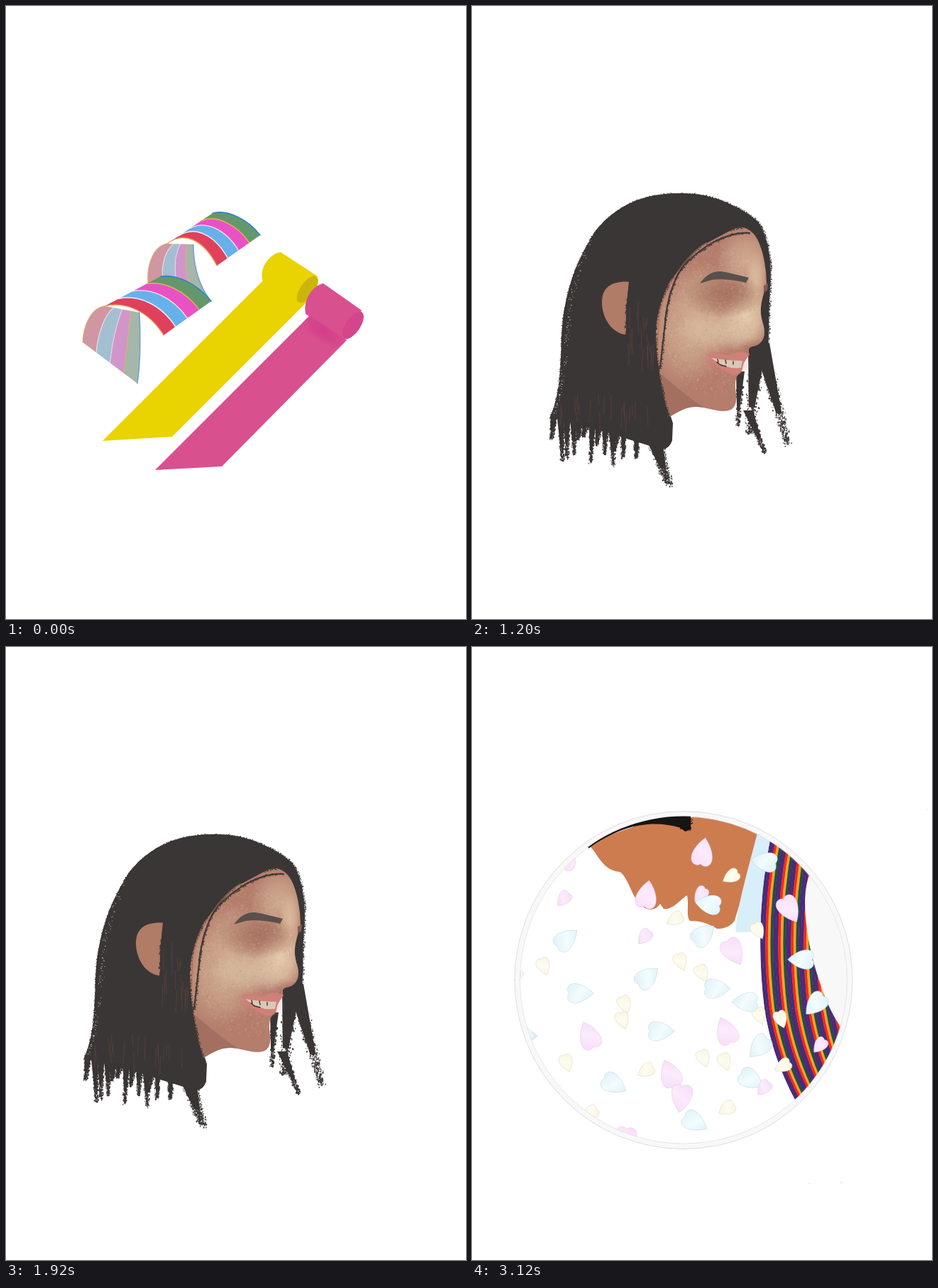
Write an HTML page with a canvas that moves like this. It is 648 px wide and 864 px high and loops after 3600 ms.

```html
<!DOCTYPE html>
<html lang="en">
<head>
<meta charset="utf-8">
<title>Streamers, portrait, confetti</title>
<style>
html, body { margin: 0; width: 100%; height: 100%; overflow: hidden; background: #fff; }
canvas { position: absolute; left: 0; top: 0; width: 648px; height: 864px; opacity: 0; }
</style>
</head>
<body>
<script>
const W = 648, H = 864, HOLD = 1200;
let g; // context of the scene being drawn
let seed = 7;
const rnd = () => (seed = (seed * 16807) % 2147483647) / 2147483647;
const spread = w => (rnd() + rnd() - 1) * w;
const mix = (a, b, t) => a.map((v, i) => v + (b[i] - v) * t);

function fill(d, color) {
  g.fillStyle = color;
  g.fill(new Path2D(d));
}

function line(d, color, width = 1) {
  g.strokeStyle = color;
  g.lineWidth = width;
  g.lineCap = g.lineJoin = 'round';
  g.stroke(new Path2D(d));
}

function clipped(d, draw) {
  g.save();
  g.clip(new Path2D(d));
  draw();
  g.restore();
}

function glow(x, y, rx, ry, rgb, alpha, turn = 0) {
  const s = g.createRadialGradient(0, 0, 0, 0, 0, 1);
  s.addColorStop(0, `rgba(${rgb},${alpha})`);
  s.addColorStop(.5, `rgba(${rgb},${alpha * .65})`);
  s.addColorStop(1, `rgba(${rgb},0)`);
  g.save();
  g.translate(x, y);
  g.rotate(turn);
  g.scale(rx, ry);
  g.fillStyle = s;
  g.fillRect(-1, -1, 2, 2);
  g.restore();
}

/* ---- party streamers ---- */

const BRIGHT = ['#e0405c', '#67b1ea', '#ea51c5', '#63986c'];
const FADED = ['#cf97a2', '#a4bed2', '#d196c9', '#a5b6aa'];
const SEAMS = ['#e6a35c', '#f3eef6', '#f6dff0', '#e3b04f', '#2d7fd2'];

// Stripes blended between a front and a back Bézier edge.
function sheet(front, back, colors, alpha = 1) {
  const edges = SEAMS.map((_, i) => mix(front, back, i / 4));
  const forth = e => `${e.slice(0, 2)}C${e.slice(2)}`;
  const home = e => `${e.slice(6)}C${[e[4], e[5], e[2], e[3], e[0], e[1]]}`;
  colors.forEach((c, i) => fill(`M${forth(edges[i])}L${home(edges[i + 1])}Z`, c));
  g.globalAlpha = alpha;
  edges.forEach((e, i) => line('M' + forth(e), SEAMS[i], 1.4));
  g.globalAlpha = 1;
}

function roll(strip, body, x, y, color, inside) {
  fill(strip, color);
  fill(body, color);
  for (const [c, grow] of [[color, 0], [inside, -.7]]) {
    g.beginPath();
    g.ellipse(x, y, 10.5 + grow, 22.5 + grow, .6, 0, 7);
    g.fillStyle = c;
    g.fill();
  }
}

function streamers() {
  sheet([227, 335, 208, 338, 198, 364, 200, 390], [264, 336, 264, 370, 274, 398, 289, 416], FADED, .6);
  sheet([227, 335, 252, 316, 279, 331, 297, 366], [291, 292, 310, 286, 341, 300, 358, 323], BRIGHT);
  sheet([139, 423, 120, 425, 109, 450, 108, 474], [188, 432, 190, 475, 189, 508, 185, 532], FADED, .6);
  sheet([139, 423, 168, 416, 201, 430, 222, 464], [218, 381, 240, 378, 268, 390, 289, 416], BRIGHT);

  roll('M136 613L362 387L425 416L234 607Z',
    'M387 347L439 381L411 418L362 388C355 371 372 348 387 347Z', 424.5, 399.5, '#e9d300', '#cbb50a');
  const pink = 'M210 654L428 436L480 471L304 649Z';
  roll(pink, 'M447 391L501 429L476 470L422 434C418 414 432 394 447 391Z', 488.5, 450, '#d9508f', '#d4458c');
  clipped(pink, () => glow(447, 458, 42, 17, '211,58,136', .8, .6));
}

/* ---- portrait ---- */

const HAIR = '#3b3636';
const CROWN = 'M110 580C123 550 125 515 126 470C128 410 145 361 174 317C204 280 242 264 292 264'
  + 'C333 263 374 279 403 304C419 327 424 368 419 410L417 500';
const FACE = 'M376 310C400 308 411 345 414 375L415 393C410 408 406 420 407 434C408 445 412 450 412 460'
  + 'C412 471 405 479 394 480C387 483 391 487 390 492L380 500C383 507 380 512 376 518'
  + 'C370 525 371 532 371 539C373 554 374 566 362 570C346 574 330 564 314 565'
  + 'C298 565 286 575 270 584L180 582L250 420L320 340Z';
const PARTING = 'M381 312C351 313 317 338 294 364C280 382 259 421 259 463C260 507 269 551 278 579';

// Loose specks along a path.
function grit(d, count, width, color, size = 1) {
  const p = document.createElementNS('http://www.w3.org/2000/svg', 'path');
  p.setAttribute('d', d);
  const len = p.getTotalLength();
  g.fillStyle = color;
  for (let i = 0; i < count; i++) {
    const q = p.getPointAtLength(rnd() * len), s = .5 + rnd() * size;
    g.fillRect(q.x + spread(width), q.y + spread(width), s, s);
  }
}

// A dry brush stroke which narrows and breaks up toward its end.
function strand(x0, y0, x1, y1, w) {
  const [mx, my] = mix([x0, y0], [x1, y1], .7);
  fill(`M${x0 - w} ${y0}L${mx - w * .35} ${my}L${mx + w * .3} ${my}L${x0 + w} ${y0}Z`, HAIR);
  for (let i = 0; i < w * 45; i++) {
    const t = .25 + rnd() * .75, [x, y] = mix([x0, y0], [x1, y1], t);
    const s = .5 + rnd() * 1.2;
    g.fillRect(x + spread(w * (1.15 - t * .6)), y + spread(4), s, s * 1.5);
  }
}

function mouth() {
  glow(358, 502, 36, 20, '205,125,115', .7, .15);
  fill('M330 491C342 488 354 494 366 491C375 485 384 487 391 491C386 499 382 502 381 511'
    + 'C379 521 370 522 361 517C348 512 338 502 330 491Z', '#cf8078');
  fill('M337 496Q360 500 381 500L379 510Q357 513 337 496Z', '#d8c9b9');
  line('M345 502L350 506L358 508M346 498L347 502M357 499L358 504M368 501L368 505', '#4b302c', 1.4);
}

function face() {
  fill(FACE, '#b47d6c');
  clipped(FACE, () => {
    glow(312, 448, 62, 92, '214,183,153', .85, .25);
    glow(385, 359, 42, 48, '216,184,156', .75);
    glow(386, 439, 38, 50, '230,207,175', 1, .25);
    glow(400, 389, 16, 44, '225,197,165', .8);
    glow(350, 458, 65, 30, '220,194,164', .75);
    glow(355, 408, 58, 31, '160,107,91', .75);
    glow(396, 483, 24, 13, '172,108,94', .7);
    for (let i = 0; i < 1500; i++) {
      const a = rnd() * 6.3, r = Math.sqrt(rnd());
      g.fillStyle = rnd() < .55 ? 'rgba(236,214,185,.1)' : 'rgba(153,103,82,.06)';
      g.fillRect(340 + Math.cos(a) * r * 74, 440 + Math.sin(a) * r * 108, 2.5, 2.5);
    }
    fill('M255 510C280 530 303 551 326 565L270 590Z', '#a36f60');
  });
  line('M333 408C342 399 356 402 365 409M337 415Q352 419 366 411', 'rgba(145,94,80,.25)');
  fill('M321 391C330 379 338 374 350 374C364 376 377 380 390 383L386 390C370 386 350 384 338 386Z', '#58504c');
  fill('M411 394L417 391L416 401L411 403Z', '#805b50');
  mouth();
}

function portrait() {
  fill(CROWN + 'L398 490L300 470L265 530L283 588L282 612Q277 627 264 624L180 598Z', HAIR);
  grit(CROWN, 1100, 1.7, HAIR);
  grit('M112 580C130 545 131 480 137 430C145 385 154 350 170 328', 130, 5, '#f4f1f0', .5);

  for (let x = 112; x < 250; x += 9) strand(x + 4, 575 + (x - 112) * .15, x - 2 + rnd() * 8, 602 + rnd() * 45, 5.5);
  strand(254, 602, 276, 673, 13);
  strand(407, 475, 444, 617, 12);
  strand(402, 480, 391, 602, 13);
  strand(389, 570, 412, 628, 7);
  strand(378, 515, 374, 590, 6);

  face();

  fill(PARTING + 'L282 612Q277 627 264 624L180 598L168 460L175 350C210 275 330 255 403 308'
    + 'Q404 326 408 340Q398 315 381 312Z', HAIR);
  fill('M228 389C200 386 183 394 183 417C183 440 197 461 216 463Z', '#b07b67');
  fill('M221 386L239 382L249 470L222 468C212 452 220 410 221 386Z', HAIR);
  grit('M222 393C217 421 216 440 217 462', 160, 2.5, HAIR);
  grit(PARTING, 500, 2, HAIR);
  const wisp = 'M391 320C357 317 322 341 297 367C283 386 274 419 272 447L265 510';
  line(wisp, '#493b36', 2.2);
  grit(wisp, 400, 2.5, HAIR);
  line('M330 334C300 352 274 394 264 430L261 482', 'rgba(166,111,91,.6)', 1.8);
  for (let i = 0; i < 40; i++) {
    const low = i % 2, x = low ? 120 + rnd() * 145 : 220 + rnd() * 38, y = low ? 545 + rnd() * 35 : 395 + rnd() * 90;
    line(`M${x} ${y}l${spread(3)} ${10 + rnd() * 24}`, 'rgba(128,86,70,.26)', 1.3);
  }
}

/* ---- confetti plate ---- */

// One confetti motif as x, y, direction of the tip; it repeats on a slanted lattice.
const MOTIF = [
  { size: 41, light: '#fcebfd', dark: '#f8def8', rim: '#dcc5df',
    at: [[165, 548, -112], [132, 296, -80], [254, 376, 60], [102, 642, 98]] },
  { size: 25, light: '#fcebfd', dark: '#f8def8', rim: '#dcc5df',
    at: [[129, 355, 130], [297, 568, 130]] },
  { size: 26, light: '#fdfcf1', dark: '#f8f7e2', rim: '#d9d8bd',
    at: [[101, 450, 70], [212, 526, 72], [245, 597, 150], [210, 406, 62], [172, 330, 150], [242, 531, 70]] },
  { size: 38, light: '#f3fcfe', dark: '#e0f3f7', rim: '#bcd3d9',
    at: [[133, 412, -40], [152, 488, 0], [200, 616, 30], [271, 447, 180], [291, 510, 133], [219, 309, 190]] }
];
const HEART = 'M.5 0C.46 .06 .12 .36 -.2 .36C-.46 .36 -.52 .12 -.4 0'
  + 'C-.52 -.12 -.46 -.36 -.2 -.36C.12 -.36 .46 -.06 .5 0Z';

function heart(x, y, deg, { size, light, dark, rim }) {
  g.save();
  g.translate(x, y);
  g.rotate(deg * Math.PI / 180);
  g.scale(size, size);
  const s = g.createLinearGradient(-.4, -.3, .4, .2);
  s.addColorStop(0, dark);
  s.addColorStop(.55, light);
  s.addColorStop(1, dark);
  fill(HEART, s);
  line(HEART, rim, .5 / size);
  g.restore();
}

function confetti() {
  for (const col of [0, 1]) for (const row of [0, 1]) {
    for (const kind of MOTIF) for (const [x, y, deg] of kind.at) {
      const cut = !col && x - .4 * y > 20; // the left column ends along a diagonal
      if (!cut) heart(x + 193 * col - 79 * row, y - 6.5 * col + 60 * row, deg, kind);
    }
  }
}

const disc = r => `M${298 - r} 469.5a${r} ${r} 0 1 1 ${2 * r} 0a${r} ${r} 0 1 1 ${-2 * r} 0Z`;
const SASH = 'M420 272C405 350 402 430 412 510C420 560 435 600 455 638L540 640L520 536'
  + 'C504 515 491 480 480 440C470 400 464 350 475 322L470 270Z';

function stripes() {
  const colors = ['#4b2a78', '#4b2a78', '#f32a1b', '#f7a22f', '#1f5340'], step = 3.6;
  for (let i = 0; i < 35; i++) {
    const x = (i + .5) * step;
    line(`M${420 + x} 272c-15 78 -18 158 -8 238c8 50 23 90 43 128`, colors[i % 5], step + .4);
  }
}

function plate() {
  fill(disc(238), '#f8f8f8');
  line(disc(238), '#d2d2d2', .7);
  clipped(disc(230.5), () => {
    fill(disc(230.5), '#fff');
    fill('M460 300H540V560H515C504 515 491 480 480 440C470 400 464 350 475 322Z', '#f8f8f8');
    fill('M160 276C177 286 180 314 208 317C219 323 224 348 234 359C243 372 257 374 265 362'
      + 'L270 369C283 371 292 357 303 350C306 365 301 379 307 386C321 386 332 389 345 397'
      + 'C358 398 370 390 371 382L410 255L298 230Z', '#cd7c4f');
    fill('M402 262L422 268C412 320 407 365 408 401L372 402C370 378 391 306 402 262Z', '#d8eef9');
    clipped(SASH, stripes);
    confetti();
  });
  line(disc(230.5), '#dedede', .7);
  clipped(disc(231), () => {
    fill('M164 281C210 247 250 237 308 237L308 257L300 260L294 255C255 243 211 250 164 284Z', '#171514');
    grit('M292 254L307 257L308 242', 90, 3, '#171514');
  });
  line('M68 456L73 460L69 467M84 543L91 549L84 552', '#d5d5d5', .8);
  line('M641 229h1M475 756h1M519 755h2', '#cfcfcf');
}

/* ---- slideshow ---- */

const scenes = [streamers, portrait, plate];
scenes.forEach((draw, i) => {
  const c = document.createElement('canvas');
  c.width = W;
  c.height = H;
  document.body.append(c);
  g = c.getContext('2d');
  draw();
  const show = c.animate([
    { opacity: 1, offset: 0, easing: 'step-end' },
    { opacity: 0, offset: 1 / scenes.length },
    { opacity: 0, offset: 1 }
  ], { duration: HOLD * scenes.length, delay: HOLD * (i - scenes.length), iterations: Infinity });
  show.startTime = document.timeline.currentTime;
});
</script>
</body>
</html>
```
